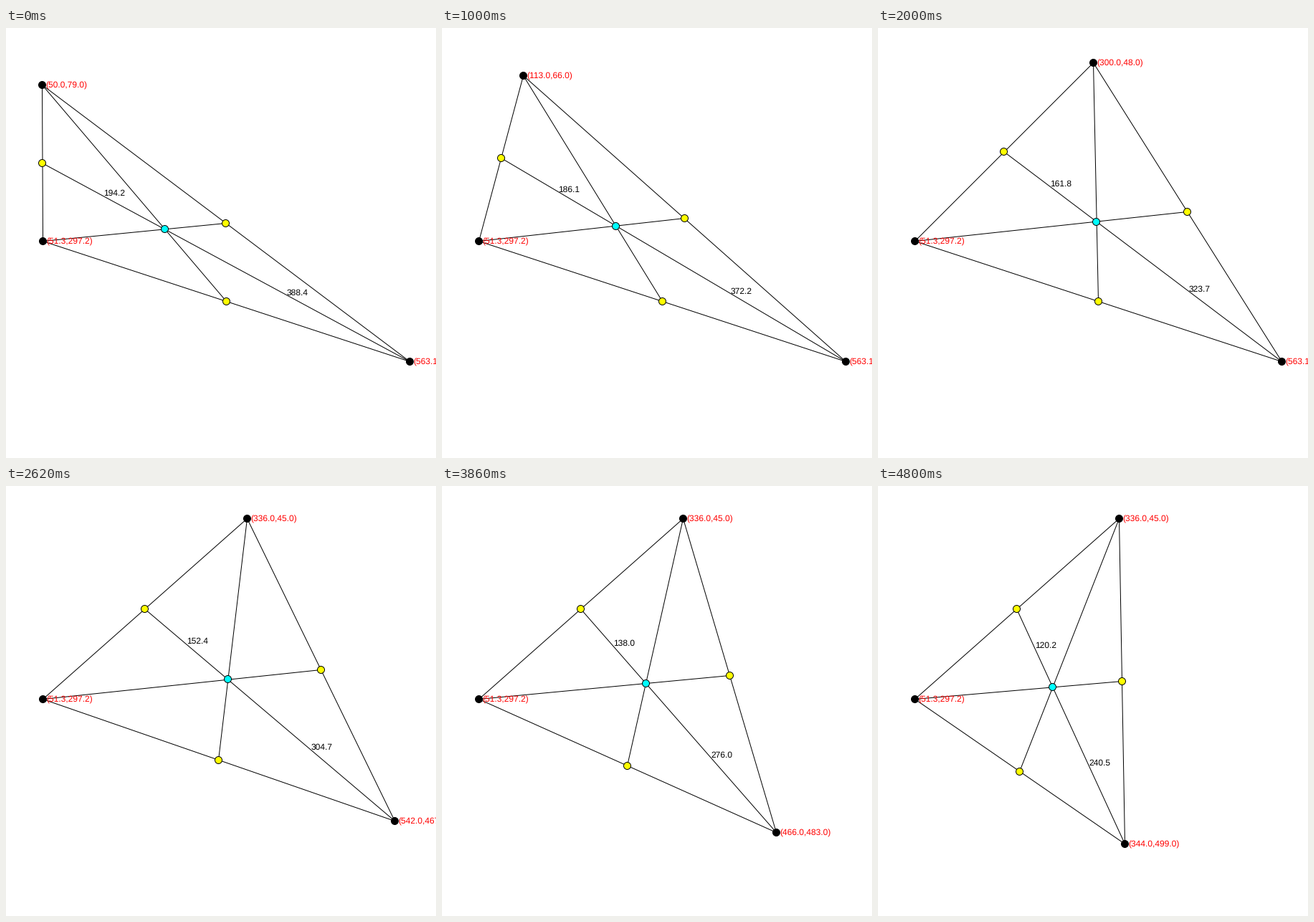
These frames come from a looping animation (600x600 px, 5880 ms). A matplotlib script:

```python
import numpy as np
import matplotlib.pyplot as plt
from matplotlib.animation import FuncAnimation
from matplotlib.patches import Circle

SIZE, DPI = 600, 100
STEP, LOOP = 20, 5880
PX = 72 / DPI

plt.rcParams.update({
    "path.snap": False,
    "text.hinting": "none",
    "font.family": "Liberation Sans",
})

# Corners start here, in the order A, B, C
START = [np.array(p) for p in ((50, 79), (51.3, 297.2), (563.1, 465.15))]

# Each leg of a drag: begin ms, end ms, corner it leads to
A_LEGS = [(0, 100, (68, 75)), (680, 1000, (113, 66)), (1000, 1480, (182, 58)),
          (1480, 1880, (250, 51)), (1880, 2220, (336, 45))]
C_LEGS = [(2480, 2620, (542, 467)), (2960, 3080, (514, 474)),
          (3540, 3860, (466, 483)), (3860, 4800, (344, 499))]


def dragged(pos, legs, t):
    """Steady pace along each leg; the pointer moves in whole pixels."""
    for begin, end, goal in legs:
        if t <= begin:
            break
        u = min((t - begin) / (end - begin), 1)
        # the last stretch of a leg that outpaces its end slows down
        pos = np.rint(pos + (np.array(goal) - pos) * ease(u, begin))
    return pos


def ease(u, begin):
    return 1 - (1 - u) ** 2 if begin == A_LEGS[-1][0] else u


def pixel(p):
    return np.floor(p) + 0.5


fig = plt.figure(figsize=(SIZE / DPI, SIZE / DPI), dpi=DPI, facecolor="white")
ax = fig.add_axes([0, 0, 1, 1])
ax.set(xlim=(0, SIZE), ylim=(SIZE, 0))
ax.axis("off")


def make_line():
    return ax.plot([], [], color="black", lw=PX, zorder=1)[0]


def make_dot(color):
    return ax.add_patch(Circle((0, 0), 5, fc=color, ec="black", lw=PX, zorder=2))


def make_text(color):
    return ax.text(0, 0, "", color=color, fontsize=12 * PX,
                   ha="left", va="baseline", zorder=3)


sides = [make_line() for _ in range(3)]
medians = [make_line() for _ in range(3)]
corner_dots = [make_dot("black") for _ in range(3)]
mid_dots = [make_dot("#ffff00") for _ in range(3)]
center_dot = make_dot("#00ffff")
corner_labels = [make_text("#ff0000") for _ in range(3)]
length_labels = [make_text("black") for _ in range(2)]


def join(line, p, q):
    line.set_data(*zip(pixel(p), pixel(q)))


def write_length(label, p, q):
    label.set_position(np.floor((p + q) / 2 + 0.5))
    label.set_text(f"{np.hypot(*(q - p)):.1f}")


def draw(i):
    t = i * STEP
    a, b, c = START
    corners = [dragged(a, A_LEGS, t), b, dragged(c, C_LEGS, t)]
    center = sum(corners) / 3
    for k, p in enumerate(corners):
        q, r = corners[(k + 1) % 3], corners[(k + 2) % 3]
        mid = (q + r) / 2
        join(sides[k], p, q)
        join(medians[k], p, mid)
        corner_dots[k].center = pixel(p)
        mid_dots[k].center = pixel(mid)
        corner_labels[k].set_position(np.floor(p) + 5)
        corner_labels[k].set_text(f"({p[0]:.1f},{p[1]:.1f})")
    center_dot.center = pixel(center)
    write_length(length_labels[0], (corners[0] + b) / 2, center)
    write_length(length_labels[1], center, corners[2])
    return []


anim = FuncAnimation(fig, draw, frames=LOOP // STEP, interval=STEP,
                     repeat=True, repeat_delay=0, blit=False)
plt.show()
```
